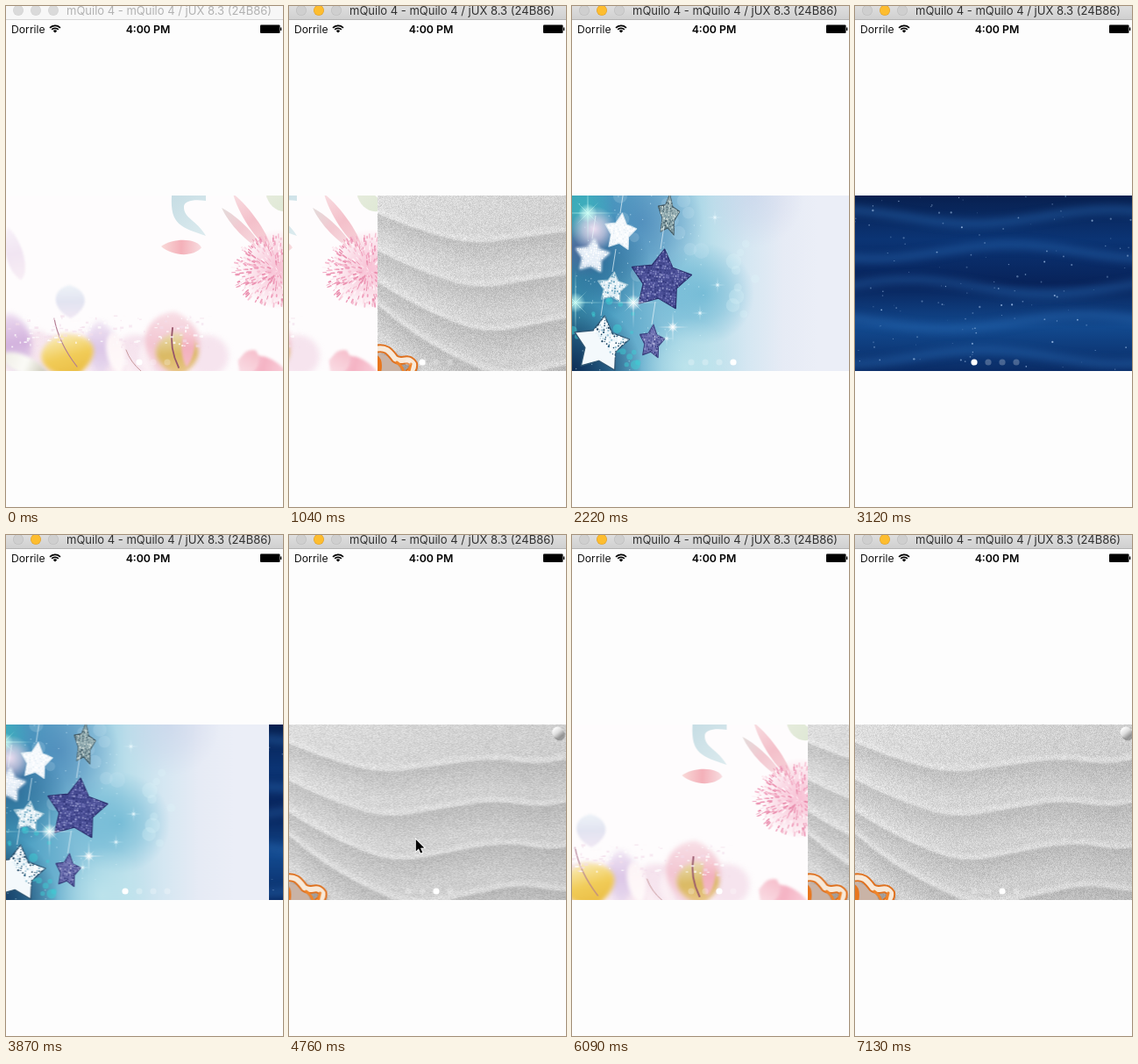
Recreate the animation shown at these times as an HTML page with a canvas. Size 316 by 571 pixels, loop 8000 ms.

```html
<!DOCTYPE html>
<html lang="en">
<head>
<meta charset="utf-8">
<title>Carousel</title>
<style>
  html, body { margin: 0; width: 100%; height: 100%; overflow: hidden; background: #fdfdfd; }
  canvas { display: block; width: 316px; height: 571px; }
</style>
</head>
<body>
<canvas id="stage" width="316" height="571"></canvas>
<script>
const W = 316, H = 571, PW = 320, PH = 200, TOP = 216, LOOP = 8000;
const g = document.getElementById('stage').getContext('2d');
const FONT = 'Inter, "Open Sans", sans-serif';

// ---------- helpers ----------
function rng(seed) {
  return () => {
    seed = (seed + 0x6D2B79F5) | 0;
    let t = Math.imul(seed ^ (seed >>> 15), 1 | seed);
    t = (t + Math.imul(t ^ (t >>> 7), 61 | t)) ^ t;
    return ((t ^ (t >>> 14)) >>> 0) / 4294967296;
  };
}

function page(draw, i) {
  const c = document.createElement('canvas');
  c.width = PW;
  c.height = PH;
  draw(c.getContext('2d'), rng(11 + i * 13));
  return c;
}

function disc(c, x, y, r, fill) {
  c.fillStyle = fill;
  c.beginPath();
  c.arc(x, y, r, 0, Math.PI * 2);
  c.fill();
}

function path(c, d, color, width) {
  const p = new Path2D(d);
  if (width) {
    c.strokeStyle = color;
    c.lineWidth = width;
    c.stroke(p);
  } else {
    c.fillStyle = color;
    c.fill(p);
  }
}

function ramp(c, x0, y0, x1, y1, ...colors) {
  const grad = c.createLinearGradient(x0, y0, x1, y1);
  colors.forEach((col, i) => grad.addColorStop(i / (colors.length - 1), col));
  return grad;
}

function glow(c, x, y, r, rgb, a) {
  const grad = c.createRadialGradient(x, y, 0, x, y, r);
  [1, 0.6, 0].forEach((f, i) => grad.addColorStop(i / 2, `rgba(${rgb},${a * f})`));
  c.fillStyle = grad;
  c.fillRect(x - r, y - r, r * 2, r * 2);
}

function blurred(c, px, draw) {
  c.filter = `blur(${px}px)`;
  draw();
  c.filter = 'none';
}

const pick = (rand, list) => list[Math.floor(rand() * list.length)];

// ---------- pages ----------
function night(c, rand) {
  c.fillStyle = ramp(c, 0, 0, 0, PH, '#082050', '#0b3474', '#08235a', '#12498e', '#0a2c66');
  c.fillRect(0, 0, PW, PH);
  c.lineWidth = 9;
  c.strokeStyle = 'rgba(44,108,180,.45)';
  blurred(c, 4, () => {
    for (let y = 24; y < PH; y += 40) {
      c.beginPath();
      for (let x = -10; x <= PW + 10; x += 10) c.lineTo(x, y + 8 * Math.sin(x / 50 + y));
      c.stroke();
    }
  });
  for (let i = 0; i < 130; i++) {
    disc(c, rand() * PW, rand() * PH, 0.4 + rand() * 0.8, `rgba(190,220,255,${0.2 + rand() * 0.5})`);
  }
}

// Leaf shape growing from its base (x, y) in the given direction.
function petal(c, x, y, len, w, deg, colors, blur = 0.6) {
  c.save();
  c.translate(x, y);
  c.rotate(deg * Math.PI / 180);
  blurred(c, blur, () => path(c,
    `M0 0C${len * 0.3} ${-w} ${len * 0.9} ${-w} ${len} 0C${len * 0.8} ${w} ${len * 0.3} ${w} 0 0`,
    ramp(c, 0, 0, len, 0, ...colors)));
  c.restore();
}

function flowers(c, rand) {
  c.fillStyle = '#fefcfd';
  c.fillRect(0, 0, PW, PH);

  // loose petals
  path(c, 'M189 0C187 34 200 36 228 46C218 28 202 26 203 12C204 6 214 4 228 6V0Z', ramp(c, 188, 0, 228, 40, '#c6dde4', '#dbeaee'));
  petal(c, 177, 58, 46, 11, 2, ['#f9dad9', '#f4b0b9', '#f8dde0']);
  petal(c, 246, 14, 64, 7, 46, ['#e3dcdb', '#f3c9d1', '#f8dbe1']);
  petal(c, 259, -2, 76, 8, 56, ['#f8dde1', '#f4c0ca', '#f7d4da']);
  petal(c, 296, -6, 36, 12, 40, ['#e6ecdd', '#dfe8d5']);
  petal(c, 2, 36, 62, 13, 76, ['#f8f2f9', '#f1e5f2', '#f8eef5'], 1);

  // shaggy bloom
  glow(c, 312, 84, 46, '246,178,202', 0.8);
  c.lineCap = 'round';
  const pinks = ['#f0a0bd', '#f6bfd2', '#fbdde7', '#ea90af', '#fff3f7'];
  for (let i = 0; i < 520; i++) {
    const a = rand() * Math.PI * 2, d = 46 * Math.sqrt(rand()), len = 1 + rand() * 4;
    const x = 310 + Math.cos(a) * d * 1.1, y = 86 + Math.sin(a) * d * 0.85;
    path(c, `M${x} ${y}l${Math.cos(a) * len} ${Math.sin(a) * len}`, pick(rand, pinks), 0.8 + rand() * 1.2);
  }

  // hazy bed along the bottom
  blurred(c, 3, () => {
    for (let x = 0; x < 232; x += 7) {
      disc(c, x, 172 + rand() * 28, 12 + rand() * 13, pick(rand, ['#f8e8f0', '#f3e6f3', '#f6e4ee', '#fbeff4']));
    }
  });
  petal(c, 74, 140, 38, 22, -92, ['#f1e8f4', '#e2e4f1', '#eef3f8'], 1);
  petal(c, 16, 205, 72, 26, -100, ['#eadcef', '#d2b1dd', '#eddcf0'], 3);
  petal(c, 108, 205, 62, 22, -90, ['#e9dbef', '#dcc7e7', '#f1e6f4'], 3);
  petal(c, 130, 205, 50, 14, -100, ['#fffafa', '#fdf4f6'], 2);
  petal(c, 78, 208, 52, 40, -106, ['#e9bb42', '#f1cc58', '#f9ebb6'], 2.5);
  petal(c, 50, 206, 62, 14, -156, ['#bdbaa4', '#fbfbf7', '#eeece4'], 2);
  petal(c, 187, 210, 78, 42, -86, ['#f6dbe3', '#f3c6d2', '#f8e0e7'], 2.5);
  petal(c, 198, 206, 50, 32, -96, ['#ecc890', '#dab961', '#eadcb6'], 2.5);
  petal(c, 206, 196, 46, 10, -86, ['#f4bcc6', '#f2b0bd', '#f8d6dd'], 1.5);
  petal(c, 322, 204, 60, 16, -164, ['#f9d3dd', '#f5b3c4', '#fadfe6'], 1.5);
  petal(c, 268, 206, 34, 14, -60, ['#fae0e7', '#f6bfcc'], 1.5);
  path(c, 'M55 140Q60 168 81 195', '#b27c92', 1.2);
  path(c, 'M190 151Q186 174 197 196', '#96556a', 1.8);
  path(c, 'M137 176Q142 190 154 200', '#c79a9c', 1);

  // ragged petal edges
  for (let i = 0; i < 150; i++) {
    c.fillStyle = pick(rand, ['rgba(254,252,253,.8)', 'rgba(243,222,236,.6)']);
    c.fillRect(rand() * 235, 136 + rand() * 36, 1 + rand() * 4, 1 + rand() * 2);
  }
}

// One dune profile; every ridge repeats it lower, shifted and a little steeper.
const DUNE = [[-40, -64], [0, -40], [55, -16], [108, 0], [165, -9], [232, -20], [288, -11], [330, -22], [370, -26]];

function ridge(c, i, dy) {
  const at = ([x, y]) => [x + i * i * 4, 53 + i * 51 + y * (0.85 + i * 0.17) + dy];
  c.beginPath();
  DUNE.slice(1).forEach((p, j) => {
    const [x0, y0] = at(DUNE[j]), [x, y] = at(p);
    c.quadraticCurveTo(x0, y0, (x0 + x) / 2, (y0 + y) / 2);
  });
  c.stroke();
}

function sand(c, rand) {
  c.fillStyle = ramp(c, 0, 0, PW, PH, '#dddddd', '#d2d2d2', '#c8c8c8');
  c.fillRect(0, 0, PW, PH);
  for (let i = 0; i < 4; i++) {
    c.lineWidth = 2;
    for (let d = 0; d < 30; d++) {
      c.strokeStyle = `rgba(125,125,125,${0.13 * (1 - d / 30)})`;
      ridge(c, i, d + 3);
    }
    c.strokeStyle = 'rgba(234,234,234,.6)';
    c.lineWidth = 5;
    blurred(c, 2, () => ridge(c, i, -1));
  }
  const img = c.getImageData(0, 0, PW, PH), d = img.data;
  for (let i = 0; i < d.length; i += 4) {
    const n = (rand() + rand() - 1) * 20;
    for (let j = 0; j < 3; j++) d[i + j] += n;
  }
  c.putImageData(img, 0, 0);

  // pearl
  disc(c, 311, 12, 6.5, 'rgba(90,90,90,.45)');
  disc(c, 309, 9, 6.5, ramp(c, 305, 4, 313, 14, '#ffffff', '#dedede', '#8d8d8d'));

  // shell: a pale arch with orange rims over a shaded hollow
  blurred(c, 2, () => path(c, 'M0 180Q26 176 46 198V204H0Z', 'rgba(110,100,95,.5)'));
  path(c, 'M0 180Q20 182 28 202H0Z', '#c9b3a6');
  const arch = 'M-3 175C10 172 14 178 20 186C28 192 34 182 41 192Q42 198 36 202';
  c.lineCap = 'round';
  path(c, arch, '#df711f', 10);
  path(c, arch, '#f8e9d8', 6);
  path(c, 'M-2 184Q5 188 1 204', '#e8761d', 5);
  path(c, 'M22 190Q30 196 30 204M38 192L36 200', '#f0842a', 3);
}

function sparkle(c, x, y, r, rgb = '255,255,255', a = 0.85) {
  glow(c, x, y, r * 0.3, rgb, a);
  for (let i = 0; i < 4; i++) {
    const len = i % 2 ? r * 0.5 : r, dx = len * Math.cos(i * Math.PI / 4), dy = len * Math.sin(i * Math.PI / 4);
    path(c, `M${x - dx} ${y - dy}L${x + dx} ${y + dy}`,
      ramp(c, x - dx, y - dy, x + dx, y + dy, `rgba(${rgb},0)`, `rgba(${rgb},${a})`, `rgba(${rgb},0)`), 1);
  }
}

// Plump five-pointed star on a thread, studded with tinted beads.
function star(c, rand, { x, y, r, sx = 1, fill, edge, tints, soft = 0.4, plainTo = -9 }) {
  path(c, `M${x} ${y - r}l4 -26`, 'rgba(232,244,250,.7)', 1);
  c.save();
  c.translate(x, y);
  c.scale(sx, 1);
  c.rotate(0.13);
  c.beginPath();
  for (let i = 0; i < 10; i++) {
    const a = -Math.PI / 2 + i * Math.PI / 5, d = i % 2 ? r * 0.56 : r;
    c.lineTo(Math.cos(a) * d, Math.sin(a) * d);
  }
  c.closePath();
  c.lineJoin = 'round';
  c.fillStyle = fill;
  c.strokeStyle = edge;
  c.lineWidth = 1.4;
  blurred(c, soft, () => { c.fill(); c.stroke(); });
  c.clip();
  const step = 2.6;
  for (let v = -r; v < r; v += step) {
    for (let u = -r; u < r; u += step) {
      if (u - v > plainTo * r) disc(c, u + rand(), v + rand(), 0.6 + rand() * 0.7, pick(rand, tints));
    }
  }
  c.restore();
}

function stars(c, rand) {
  c.fillStyle = ramp(c, 0, 0, PW, 0, '#3a93b0', '#4a9fc2', '#6db2d0', '#94cbe0', '#bcdfeb', '#d5e7f2', '#e6ebf5', '#ebeef7', '#ebeef7');
  c.fillRect(0, 0, PW, PH);
  glow(c, 150, 112, 58, '70,164,200', 0.55);
  glow(c, 80, 30, 70, '58,112,172', 0.5);
  glow(c, 205, 0, 60, '190,198,228', 0.4);
  glow(c, 30, 80, 60, '36,92,138', 0.65);
  glow(c, 0, 200, 80, '10,38,80', 0.95);
  glow(c, 5, 50, 45, '96,90,150', 0.6);
  glow(c, 8, 18, 40, '60,200,196', 0.6);
  glow(c, 130, 195, 55, '196,232,238', 0.8);
  glow(c, 25, 38, 26, '246,226,244', 0.95);

  for (let i = 0; i < 9; i++) disc(c, 182 + rand() * 30, 55 + i * 10, 4 + rand() * 5, 'rgba(225,246,252,.25)');
  for (let i = 0; i < 16; i++) disc(c, 45 + rand() * 110, rand() * 90, 4 + rand() * 6, 'rgba(215,240,252,.18)');
  for (let i = 0; i < 22; i++) disc(c, rand() * 85, 100 + rand() * 100, 1.5 + rand() * 4, 'rgba(60,206,212,.5)');
  for (let i = 0; i < 90; i++) disc(c, rand() * 150, rand() * PH, 0.7, 'rgba(220,248,255,.5)');

  const violet = ['#6f72b6', '#33387c', '#55589f', '#8d92c8', '#3d4288'];
  const icy = ['#ffffff', '#2f6382', '#9cc4d6', '#e4f1f7', '#1d4563'];
  const pale = ['#ffffff', '#f4f8fc', '#e6eff6'];
  const steel = ['#e2ebe6', '#445d68', '#b0c2c2', '#7c979f'];
  const hung = [
    { x: 23, y: 69, r: 20, fill: '#e6eef8', edge: '#d5e2f0', tints: pale, soft: 1.5 },
    { x: 55, y: 42, r: 22, sx: 0.86, fill: '#f7fafd', edge: '#cfe1ec', tints: pale },
    { x: 46, y: 105, r: 18, fill: '#e3f0f6', edge: '#8fbacd', tints: ['#ffffff', '#6ba5bf', '#d9eaf2'] },
    { x: 110, y: 23, r: 25, sx: 0.52, fill: '#8ea9ae', edge: '#3c525c', tints: steel },
    { x: 101, y: 97, r: 36, fill: '#484d94', edge: '#2a2f6c', tints: violet },
    { x: 91, y: 167, r: 20, sx: 0.75, fill: '#6f72b0', edge: '#3a3f7c', tints: violet.concat('#b4b6dc') },
    { x: 33, y: 170, r: 33, fill: '#f4f9fc', edge: '#2f5673', tints: icy, plainTo: 0.1 }
  ];
  hung.forEach(s => star(c, rand, s));

  sparkle(c, 18, 20, 36, '206,255,246');
  sparkle(c, 70, 122, 30);
  sparkle(c, 4, 122, 38, '206,255,246');
  sparkle(c, 115, 150, 18);
  for (const [x, y] of [[146, 134], [163, 25], [108, 163], [166, 102]]) sparkle(c, x, y, 9, '235,250,255', 0.6);
}

const PAGES = [night, flowers, sand, stars].map(page);

// ---------- motion ----------
// The screen refreshes in coarse ticks; the window gains focus on the first one.
const FOCUS = 735, TICK = 148.4;

const flick = u => 1 - (1 - u) ** 3;
const glide = u => u * u * (3 - 2 * u);

// Finger swipes show the pointer for `lead` ms beforehand; the others are the carousel's own timer.
const swipe = (at, from, to, lead) => ({ at, from, to, lead, dur: 742, ease: flick });
const auto = (at, from, to) => ({ at, from, to, dur: 320, ease: glide });
const MOVES = [
  swipe(795, 1, 2, 60),
  swipe(1538, 2, 3, 300),
  auto(2780, 3, 4),
  swipe(3406, 4, 3, 0),
  swipe(4148, 3, 2, 200),
  swipe(5739, 2, 1, 1000),
  auto(6787, 1, 2)
];

function pose(t) {
  const p = { pos: 1, dot: 1, pointer: null };
  for (const m of MOVES) {
    const u = Math.min(1, Math.max(0, (t - m.at) / m.dur)), f = m.ease(u), dir = m.from - m.to;
    if (u > 0) p.pos = m.from + (m.to - m.from) * f;
    if (f > 0.98) p.dot = m.to % 4;
    if (t >= m.at - m.lead && u < 0.5) {
      const grip = dir > 0 ? 60 : 209, wait = Math.max(0, m.at - t);
      p.pointer = grip + dir * (wait * 0.085 + f * PW);
    }
  }
  return p;
}

// ---------- screen ----------
function text(str, x, y, size, color, weight = 400, align = 'left') {
  g.font = `${weight} ${size}px ${FONT}`;
  g.textAlign = align;
  g.fillStyle = color;
  g.fillText(str, x, y);
}

function titleBar(active) {
  g.fillStyle = active ? ramp(g, 0, 0, 0, 15, '#dedede', '#d0d0d0') : '#f7f7f7';
  g.fillRect(0, 0, W, 15);
  g.fillStyle = active ? '#b3b3b3' : '#d6d6d6';
  g.fillRect(0, 15, W, 1);
  for (let i = 0; i < 3; i++) {
    const lit = active && i === 1;
    disc(g, 14 + i * 20, 5, 6, lit ? '#e0a02c' : active ? '#bdbdbd' : '#d3d3d3');
    disc(g, 14 + i * 20, 5, 5.4, lit ? '#fdbd2f' : active ? '#cfcfcf' : '#dadada');
  }
  text('mQuilo 4 - mQuilo 4 / jUX 8.3 (24B86)', 69, 10, 13, active ? '#303030' : '#b2b2b2');
}

function statusBar() {
  text('Dorrile', 6, 31, 12.2, '#111');
  text('4:00 PM', 162, 31, 12.3, '#000', 600, 'center');
  const fan = [-Math.PI * 0.76, -Math.PI * 0.24];
  g.strokeStyle = g.fillStyle = '#000';
  g.lineWidth = 1.7;
  for (const r of [5.2, 8.2]) {
    g.beginPath();
    g.arc(56, 30.5, r, ...fan);
    g.stroke();
  }
  g.beginPath();
  g.moveTo(56, 30.5);
  g.arc(56, 30.5, 3, ...fan);
  g.fill();
  g.beginPath();
  g.roundRect(290, 21.5, 22.5, 9.5, 1);
  g.fill();
  g.fillRect(313, 24.5, 1.3, 3.5);
}

function carousel(pos, dot) {
  const left = Math.floor(pos), x = -Math.round((pos - left) * PW * 2) / 2;
  g.drawImage(PAGES[left % 4], x, TOP);
  if (x) g.drawImage(PAGES[(left + 1) % 4], x + PW, TOP);
  for (let i = 0; i < 4; i++) disc(g, 136 + i * 16, 406, 3.6, i === dot ? '#fff' : 'rgba(255,255,255,.25)');
}

function pointer(x, y) {
  const arrow = 'M0 0V13.4L3.1 10.5L5.4 15.6L7.5 14.7L5.3 9.7L9.5 9.5Z';
  g.save();
  g.translate(x, y);
  path(g, arrow, '#fff', 1.8);
  path(g, arrow, '#000');
  g.restore();
}

function draw(t) {
  const tick = Math.floor((t - FOCUS) / TICK);
  const p = pose(FOCUS + tick * TICK);
  g.fillStyle = '#fdfdfd';
  g.fillRect(0, 0, W, H);
  titleBar(tick >= 0);
  statusBar();
  carousel(p.pos, p.dot);
  if (p.pointer !== null) pointer(p.pointer, 347);
}

const start = performance.now();
function loop() {
  draw((performance.now() - start) % LOOP);
  requestAnimationFrame(loop);
}
loop();
</script>
</body>
</html>
```
